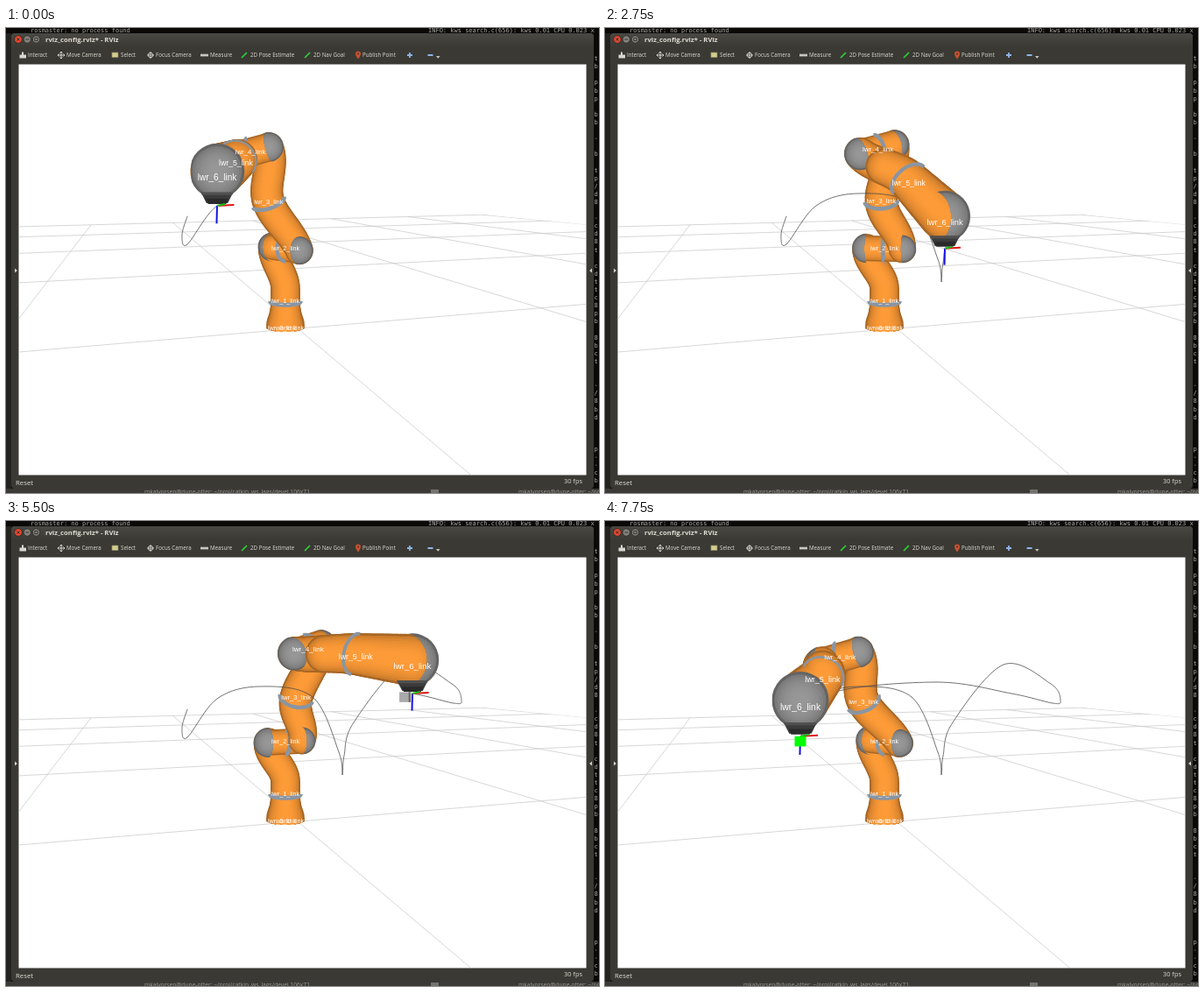
These frames come from a looping animation (677x531 px, 8 s). An HTML page with a canvas:

```html
<!DOCTYPE html>
<html lang="en">
<head>
<meta charset="utf-8">
<title>Robot arm viewer</title>
<style>
html, body { margin: 0; width: 100%; height: 100%; overflow: hidden; background: #0b0a09; }
svg, canvas { position: absolute; left: 0; top: 0; width: 677px; height: 531px; display: block; }
text { font-family: "Open Sans", sans-serif; fill: #dfdbd2; white-space: pre; }
.mono text { font: 7px "DejaVu Sans Mono", monospace; fill: #a8a8a4; }
.tools text { font-size: 6.2px; }
</style>
</head>
<body>
<svg viewBox="0 0 677 531">
  <defs>
    <linearGradient id="bar" x1="0" y1="0" x2="0" y2="1">
      <stop offset="0" stop-color="#4a4843"/><stop offset="1" stop-color="#3a3934"/>
    </linearGradient>
  </defs>
  <g class="mono" id="term">
    <text x="28" y="5">rosmaster: no process found</text>
    <text x="482" y="5">INFO: kws_search.c(656): kws 0.01 CPU 0.023 x</text>
  </g>
  <rect y="6" width="6" height="525" fill="#24231f"/>
  <rect y="526" width="677" height="5" fill="#3b3a36"/>
  <g font-size="6.7" opacity=".6">
    <text x="158" y="532">mkalvorsen@dune-otter: ~/proj/catkin_ws_lags/devel 106x71</text>
    <text x="585" y="532">mkalvorsen@dune-otter: ~/proj</text>
    <rect x="485" y="527" width="9" height="4" fill="#999"/>
  </g>
  <rect x="6" y="6" width="665" height="520" rx="4" fill="#3a3934"/>
  <path d="M6 22V10q0-4 4-4H667q4 0 4 4V22Z" fill="url(#bar)"/>
  <g stroke="#2a2925" stroke-width=".8">
    <circle cx="14" cy="13" r="4.4" fill="#e2472f"/>
    <circle cx="24.3" cy="13" r="4.2" fill="#83817a"/>
    <circle cx="34.5" cy="13" r="4.2" fill="#83817a"/>
  </g>
  <path d="M12.4 11.4l3.2 3.2m0-3.2l-3.2 3.2M22.3 13h4M32.8 11.4h3.4v3.2h-3.4Z" fill="none" stroke="#34322e" stroke-width=".9"/>
  <text x="45" y="16" font-size="7.7" font-weight="700">rviz_config.rviz* - RViz</text>
  <g class="tools">
    <path d="M15.500 30.500h7.500v4h-7.500ZM18 27.500h2v3h-2Z" fill="#d8d6cf"/>
    <text x="25" y="33.4">Interact</text>
    <path d="M59 31h8M63 27v8M60.5 29.5L59 31l1.5 1.5M65.5 29.5L67 31l-1.5 1.5M61.5 28.5L63 27l1.5 1.5M61.5 33.5L63 35l1.5-1.5" fill="none" stroke="#d8d6cf"/>
    <text x="69" y="33.4">Move Camera</text>
    <rect x="121" y="28" width="7" height="5.5" fill="#d3cd8c" stroke="#8d8a68" stroke-width=".7"/>
    <text x="131" y="33.4">Select</text>
    <g fill="none" stroke="#d8d6cf" stroke-width=".9"><circle cx="165" cy="31" r="2.7"/><path d="M161 31h8M165 27v8"/></g>
    <text x="171" y="33.4">Focus Camera</text>
    <rect x="222" y="29.7" width="9" height="2.7" fill="#c9c7c0"/>
    <text x="233" y="33.4">Measure</text>
    <path d="M269 34l6-6M341 34l6-6" stroke="#2bd334" stroke-width="1.7"/>
    <text x="279" y="33.4">2D Pose Estimate</text>
    <text x="351" y="33.4">2D Nav Goal</text>
    <path d="M402 35.5q-3-4-3-6a3 3 0 0 1 6 0q0 2-3 6Z" fill="#c9512f"/>
    <circle cx="402" cy="29.5" r="1" fill="#3a3934"/>
    <text x="407" y="33.4">Publish Point</text>
    <path d="M458 31h6M461 28v6M481.5 31h6" stroke="#8fb4e6" stroke-width="1.8"/>
    <path d="M491 32h4.500l-2.250 2.800Z" fill="#c9c7c0"/>
  </g>
  <path d="M10 274.500l3 2.500-3 2.500ZM669 274.500l-3 2.500 3 2.500Z" fill="#d0cec6"/>
  <text x="11" y="521.7" font-size="7.8">Reset</text>
  <text x="637" y="520" font-size="7.4">30 fps</text>
</svg>
<canvas id="view" width="677" height="531"></canvas>
<script>
const STEP = 250, LOOP = 8000, KNOT = 500, LEAD = 1500;
const ctx = document.getElementById('view').getContext('2d');

// Slivers of the terminal behind the window's right edge
const term = document.getElementById('term');
let seed = 7;
const rand = () => (seed = seed * 16807 % 2147483647) / 2147483647;
for (let y = 28; y < 520; y += 9.1) {
  const el = document.createElementNS('http://www.w3.org/2000/svg', 'text');
  el.setAttribute('x', 671.5);
  el.setAttribute('y', y);
  el.textContent = '-/tdcbp8'[Math.floor(rand() * 8)];
  if (rand() < 0.65) term.append(el);
}

// Tool on screen every KNOT ms, starting LEAD ms early: x, y, metres towards the viewer
const PATH = [
  [207, 215, 0.5], [201, 236, 0.5], [207, 247, 0.5],
  [241, 203, 0.53], [289, 189, 0.55], [350, 201, 0.5], [380, 264, 0.42],
  [384, 290, 0.4], [386, 268, 0.42], [397, 230, 0.42], [455, 164, 0.37], [509, 186, 0.32],
  [520, 205, 0.34], [511, 208, 0.4], [464, 197, 0.48], [376, 184, 0.55], [250, 199, 0.53],
  [223, 248, 0.55], [223, 246, 0.58], [223, 246, 0.58]
];

// Metres: x right, y towards the viewer, z up
const EYE = [0, 1.9, 0.59], FOCAL = 557, CX = 319, HORIZON = 170;
const UP = [0, 0, 1], BASE = [0, 0, 0], SHOULDER = [0, 0, 0.31];
const UPPER = 0.415, FORE = 0.405, WRIST = 0.077, AXLE = 0.07, SWIVEL = 0.27;
const ORANGE = [255, 156, 56], GREY = [152, 152, 152], BLUE = '#8a95a2';

const add = (a, b, k = 1) => a.map((v, i) => v + b[i] * k);
const sub = (a, b) => add(a, b, -1);
const scale = (a, k) => a.map(v => v * k);
const dot = (a, b) => a.reduce((sum, v, i) => sum + v * b[i], 0);
const unit = a => scale(a, 1 / Math.hypot(...a));
const cross = (a, b) => [a[1] * b[2] - a[2] * b[1], a[2] * b[0] - a[0] * b[2], a[0] * b[1] - a[1] * b[0]];
const mix = (a, b, u) => add(a, sub(b, a), u);

// Screen x, y and pixels per metre
function project([x, y, z]) {
  const s = FOCAL / (EYE[1] - y);
  return [CX + x * s, HORIZON + (EYE[2] - z) * s, s];
}

function unproject([px, py, depth]) {
  const s = FOCAL / (EYE[1] - depth);
  return [(px - CX) / s, depth, EYE[2] - (py - HORIZON) / s];
}

// Catmull-Rom through the knots
function pathAt(t) {
  const k = (t + LEAD) / KNOT, i = Math.min(PATH.length - 2, Math.floor(k)), u = k - i;
  const b = PATH[i], c = PATH[i + 1], a = PATH[i - 1] || b, d = PATH[i + 2] || c;
  return b.map((v, n) => v + 0.5 * u * (c[n] - a[n] + u * (2 * a[n] - 5 * v + 4 * c[n] - d[n] +
    u * (3 * (v - c[n]) + d[n] - a[n]))));
}

// Two-link reach from the shoulder, elbow swung a little to the left
function elbowFor(wrist) {
  const reach = sub(wrist, SHOULDER), len = Math.min(0.81, Math.hypot(...reach)), dir = unit(reach);
  const along = (len * len + UPPER * UPPER - FORE * FORE) / (2 * len);
  const out = Math.sqrt(UPPER * UPPER - along * along);
  const right = unit(cross(dir, UP)), lift = cross(right, dir);
  const swung = add(scale(lift, Math.cos(SWIVEL)), right, -Math.sin(SWIVEL));
  return add(add(SHOULDER, dir, along), swung, out);
}

// A link from a to b whose ends lean sideways onto their axles
function link(a, b, sideA, sideB, radius, from = 0, to = 1) {
  const pts = [];
  for (let i = 0; i <= 24; i++) {
    const u = from + (to - from) * i / 24;
    const lean = (1 + Math.cos(2 * Math.PI * u)) / 2;
    pts.push([add(mix(a, b, u), u < 0.5 ? sideA : sideB, lean), radius(u)]);
  }
  return pts;
}

// Nested strokes, brighter towards the middle like a lit cylinder
function tube(pts, rgb) {
  const flat = pts.map(([p, r]) => {
    const [x, y, s] = project(p);
    return [x, y, r * s];
  });
  ctx.lineCap = 'round';
  for (let rho = 1; rho > 0.15; rho -= 0.1) {
    const lit = 0.66 + 0.34 * Math.sqrt(1 - rho * rho);
    ctx.strokeStyle = `rgb(${scale(rgb, lit).map(Math.round)})`;
    for (let i = 1; i < flat.length; i++) {
      ctx.lineWidth = (flat[i - 1][2] + flat[i][2]) * rho;
      line(flat[i - 1], flat[i]);
    }
  }
}

// Visible half of a circle around an axis, traced in a frame turned along the axis
function rim(at, radius, axis) {
  const [x, y, s] = project(at), r = radius * s;
  const bulge = -dot(axis, unit(sub(EYE, at))) * r;
  ctx.translate(x, y);
  ctx.rotate(Math.atan2(-axis[2], axis[0]));
  ctx.beginPath();
  ctx.ellipse(0, 0, Math.abs(bulge), r, 0, -Math.PI / 2, Math.PI / 2, bulge < 0);
  return r;
}

function ring(at, radius, axis) {
  ctx.save();
  rim(at, radius, axis);
  ctx.strokeStyle = BLUE;
  ctx.lineCap = 'butt';
  ctx.lineWidth = 1 + 4 * Math.hypot(axis[0], axis[2]);
  ctx.stroke();
  ctx.restore();
}

// Grey end of an axle
function cap(at, radius, axis, shift = 0) {
  ctx.save();
  const frame = ctx.getTransform();
  const r = rim(add(at, axis, shift), radius, axis);
  for (const [x, y] of [[0, 1.2], [2.5, 1.2], [2.5, -1.2], [0, -1.2]]) ctx.lineTo(x * r, y * r);
  ctx.closePath();
  ctx.clip();
  ctx.setTransform(frame);
  tube([[at, radius], [add(at, UP, 0.001), radius]], GREY);
  ctx.restore();
}

function line(a, b) {
  ctx.beginPath();
  ctx.moveTo(a[0], a[1]);
  ctx.lineTo(b[0], b[1]);
  ctx.stroke();
}

function poly(pts) {
  ctx.beginPath();
  pts.forEach(p => ctx.lineTo(p[0], p[1]));
  ctx.closePath();
}

function label(s, at, dx = 0) {
  const [x, y, k] = project(at);
  ctx.font = `${k * 0.0246}px "Liberation Sans", sans-serif`;
  ctx.textAlign = 'center';
  ctx.textBaseline = 'middle';
  ctx.fillStyle = '#fff';
  ctx.fillText(s, x + dx, y);
}

function grid() {
  ctx.save();
  poly([[14, 200], [545, 213], [663, 224.5], [663, 511], [14, 511]]);
  ctx.clip();
  ctx.strokeStyle = '#c6c6c6';
  ctx.lineWidth = 0.7;
  for (let k = 0; k < 5; k++) line([14, 174 + 1 / (0.0189 - 0.00345 * k)], [2455, 164]);
  for (let k = 0; k < 6; k++) {
    const x = 97 + 94.5 * k - k * k, y = 227 - (x - 15) * 0.0258;
    line([x, y], [x + (x - 135) * 12, y + (y - 175.5) * 12]);
  }
  ctx.restore();
}

function trail(t) {
  ctx.strokeStyle = '#4c4c4c';
  ctx.lineWidth = 0.8;
  ctx.beginPath();
  for (let s = Math.max(-LEAD, t - 7750); s <= t; s += 25) ctx.lineTo(...pathAt(s).slice(0, 2));
  ctx.stroke();
}

function gripper(t) {
  const [x, y, depth] = pathAt(t), k = FOCAL / (EYE[1] - depth) / 400;
  const slab = (top, bottom, y0, y1, color) => {
    poly([[-top, y0], [top, y0], [bottom, y1], [-bottom, y1]].map(p => [x + p[0] * k, y + p[1] * k]));
    ctx.fillStyle = color;
    ctx.fill();
  };
  slab(18, 12, -15, -3, '#3b3b3b');
  slab(13, 10, -8, -2, '#2a2a2a');
  slab(18, 17, -15, -12, '#505050');
  ctx.lineCap = 'butt';
  ctx.lineWidth = 2;
  for (const [dx, dy, color] of [[-0.5, 20, '#1414e6'], [19, -1, '#e01010'], [9, -2, '#12c312']]) {
    ctx.strokeStyle = color;
    line([x, y], [x + dx * k, y + dy * k]);
  }
}

// The carried box runs slightly ahead of the tool and turns green on arrival
function box(t) {
  if (t < 4750) return;
  const [x, y] = pathAt(t + 60), placed = t >= 7250;
  ctx.fillStyle = placed ? '#00ff00' : '#a9a9a9';
  ctx.fillRect(x - 6.5, y, 13, 11.5);
  if (placed) return;
  ctx.fillStyle = '#6f6f6f';
  ctx.fillRect(x + 4, y, 2.5, 11.5);
}

function column(side) {
  ctx.save();
  ctx.beginPath();
  ctx.rect(260, 200, 120, 141);
  ctx.ellipse(CX, 341, 23.5, 6, 0, 0, 2 * Math.PI);
  ctx.clip();
  tube(link(BASE, SHOULDER, BASE, side, u => 0.057 + 0.02 * Math.max(0, 1 - 3 * u) ** 2), ORANGE);
  ring([0, 0, 0.106], 0.059, UP);
  ctx.restore();
}

// A short cylinder joining two links, with a ring at its middle
function axle(a, b, radius) {
  tube([[a, radius], [b, radius]], ORANGE);
  ring(mix(a, b, 0.5), radius, unit(sub(b, a)));
}

function robot(t) {
  const wrist = add(unproject(pathAt(t)), UP, WRIST), elbow = elbowFor(wrist);
  const head = add(wrist, UP, 0.02);
  const upper = sub(elbow, SHOULDER), fore = sub(wrist, elbow);
  const hip = unit(cross(UP, upper)), hinge = unit(cross(upper, fore)), roll = unit(cross(fore, UP));
  const hipIn = scale(hip, AXLE), hipOut = scale(hip, -AXLE);
  const hingeIn = scale(hinge, -AXLE), hingeOut = scale(hinge, AXLE);
  const upperMid = mix(SHOULDER, elbow, 0.5), foreMid = mix(elbow, wrist, 0.5);
  const upperR = u => 0.053 + 0.008 * Math.sin(Math.PI * u), foreR = u => 0.057 + 0.019 * u;

  column(hipIn);
  axle(add(SHOULDER, hipIn), add(SHOULDER, hipOut), 0.05);
  cap(add(SHOULDER, hipIn), 0.057, hip);

  tube(link(SHOULDER, elbow, hipOut, hingeIn, upperR), ORANGE);
  ring(upperMid, 0.061, unit(upper));
  cap(add(SHOULDER, hipOut), 0.053, scale(hip, -1));

  axle(add(elbow, hingeIn), add(elbow, hingeOut), 0.052);
  cap(add(elbow, hingeIn), 0.053, scale(hinge, -1));
  tube(link(elbow, head, hingeOut, BASE, foreR, 0, 0.25), ORANGE);
  cap(add(elbow, hingeOut), 0.057, hinge);
  trail(t);

  tube(link(elbow, head, hingeOut, BASE, foreR, 0.25), ORANGE);
  ring(mix(elbow, head, 0.5), 0.066, unit(fore));
  cap(head, 0.077, roll, -0.05);
  gripper(t);
  box(t);

  label('lwr_0_link', BASE, -4);
  label('world_link', BASE, 5);
  label('lwr_1_link', [0, 0, 0.106]);
  label('lwr_2_link', SHOULDER);
  label('lwr_3_link', upperMid);
  label('lwr_4_link', elbow);
  label('lwr_5_link', foreMid);
  label('lwr_6_link', wrist);
}

function draw(t) {
  ctx.clearRect(0, 0, 677, 531);
  ctx.save();
  ctx.beginPath();
  ctx.rect(14.5, 41.5, 648, 469);
  ctx.fillStyle = '#fff';
  ctx.fill();
  ctx.clip();
  grid();
  robot(t);
  ctx.restore();
}

let shown = -1;
function tick(now) {
  const t = Math.floor(now % LOOP / STEP) * STEP;
  if (t !== shown) draw(shown = t);
  requestAnimationFrame(tick);
}
draw(0);
requestAnimationFrame(tick);
</script>
</body>
</html>
```
